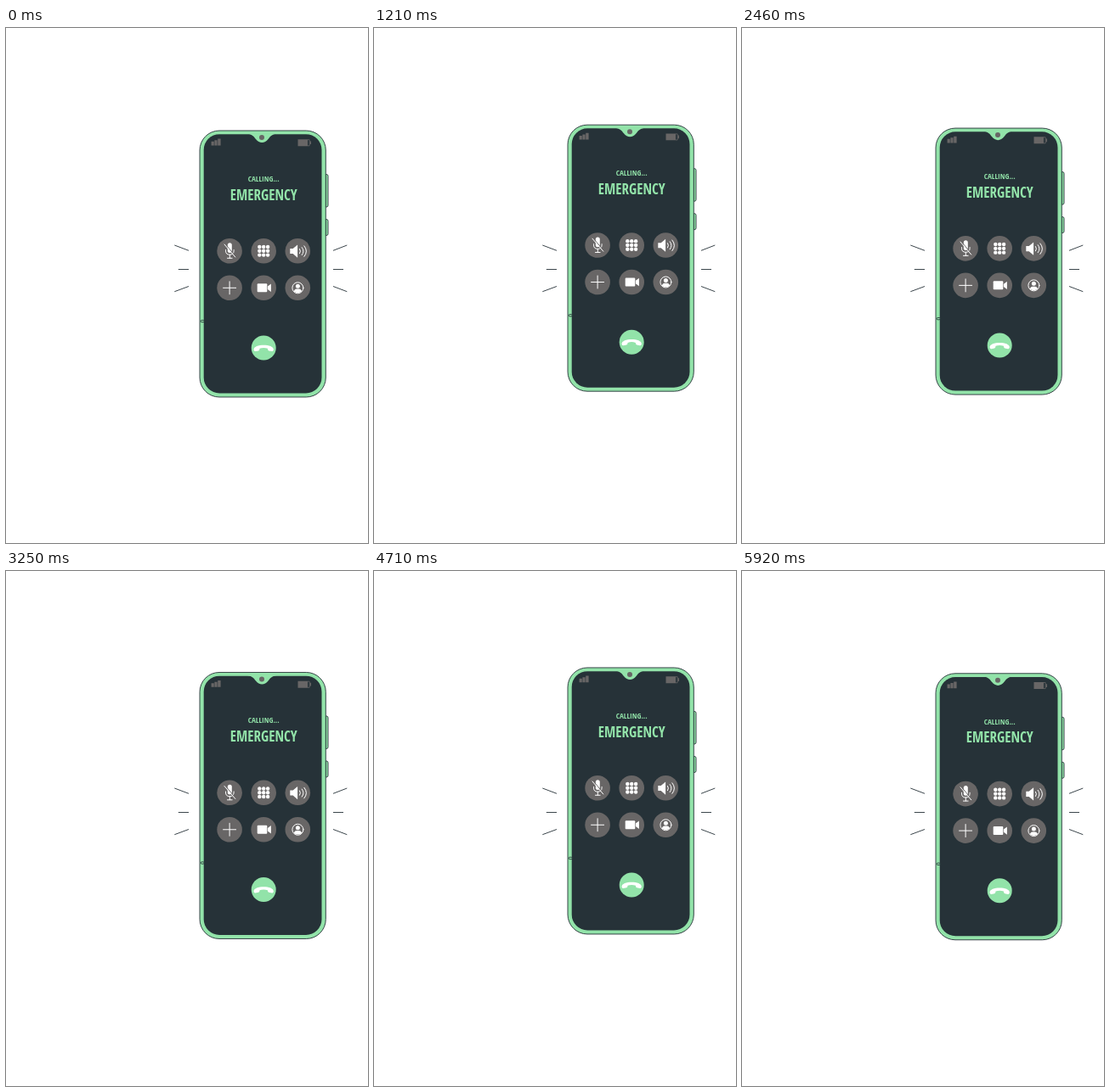
Write an HTML page that moves like this. It is 426 px wide and 607 px high and loops after 5960 ms.

```html
<!DOCTYPE html>
<html lang="en">
<head>
<meta charset="utf-8">
<title>Emergency call</title>
<style>
  html, body { margin: 0; width: 100%; height: 100%; overflow: hidden; background: #fff; }
  svg { display: block; width: 426px; height: 607px; }
  text {
    font-family: Oswald, "Open Sans Condensed", "Open Sans Condensed Light", "Noto Sans ExtraCondensed",
      "Liberation Sans Narrow", "Roboto Condensed", "Noto Sans", "Open Sans", sans-serif;
    font-weight: 300;
    font-stretch: 62.5%;
    text-anchor: middle;
    fill: #92e3a9;
  }
  .ink { stroke: #263238; stroke-width: .9; fill: none; }
  .shell { stroke: #263238; stroke-width: .9; fill: #92e3a9; }
  .grey { fill: #686666; }
  .white { fill: #fff; }
  .line { fill: none; stroke: #fff; stroke-width: 1; stroke-linecap: round; }
</style>
</head>
<body>
<svg viewBox="0 0 426 607">
  <path class="ink" d="M198.3 256 215 262.3M202.800 284.500H215M198.300 310.700 215 304.500
    M385 262.300 401.300 256M385 284.500H397M385 304.500 401.300 310.700"/>

  <g id="phone">
    <path class="shell" d="M376 172.500h1.200q1.800 0 1.800 2v34.500q0 2-1.800 2h-1.200z
      M376 225.500h1.200q1.800 0 1.800 2v15q0 2-1.800 2h-1.200z"/>
    <rect class="shell" x="228" y="121" width="148.300" height="314" rx="23"/>
    <rect x="232.700" y="125.200" width="138.800" height="305.300" rx="18.500" fill="#263238"/>
    <path fill="#92e3a9" d="M284 124.500C290 125.400 291.500 128 294 131C298 136.500 304.500 136.500 308.500 131
      C311 128 312.500 125.400 318.500 124.500z"/>
    <circle class="grey" cx="301" cy="129" r="3"/>
    <rect class="shell" x="229.200" y="344.400" width="4" height="2.300" rx="1.100"/>

    <path class="grey" d="M241.600 133.800h3.200v4.600h-3.200zM245.400 132.300h3.200v6.100h-3.200zM249.200 130.600h3.400v7.800h-3.400z
      M343.500 131.300h11.500v7.900h-11.500zM357.700 133.400h1.300v3.700h-1.300z"/>
    <path d="M355 131.700h2.100v7.100h-2.100" fill="none" stroke="#686666" stroke-width=".8"/>

    <text x="303.300" y="181" font-size="11.200" data-max="37">CALLING...</text>
    <text x="303.300" y="202.600" font-size="20.300" data-max="79">EMERGENCY</text>

    <g id="pads" class="grey"></g>

    <!-- muted microphone -->
    <rect class="white" x="260.800" y="253.300" width="5" height="11.700" rx="2.500"/>
    <path class="line" d="M258.500 261.500v1q0 4.700 4.800 4.700t4.800-4.700v-1M263.300 267.200v4M260.500 271.300h5.600"/>
    <path d="M257.800 254.300 270.600 269.600" stroke="#686666" stroke-width="1"/>
    <path class="line" d="M257 255 269.800 270"/>

    <g id="keys" class="white"></g>

    <!-- speaker -->
    <path class="white" d="M334.300 260h3.400l5.400-4.500v15.200l-5.400-4.600h-3.400z"/>
    <path class="line" d="M345.500 260.400q2 2.700 0 5.400M348.200 258.600q3.600 4.500 0 9M350.900 256.800q5.200 6.300 0 12.600"/>

    <path class="line" d="M255.600 306.300h15M263.100 298.800v15"/>

    <!-- camera -->
    <rect class="white" x="295.700" y="301.300" width="11.600" height="10" rx="1"/>
    <path class="white" d="M307.900 304.600 311.900 301.600v9.400l-4-3z"/>

    <!-- contact -->
    <circle class="line" cx="343.400" cy="306.300" r="6.500"/>
    <circle class="white" cx="343.400" cy="304.300" r="2.500"/>
    <path class="white" d="M338.800 310.500q.7-2.900 3.200-2.900h2.800q2.500 0 3.200 2.900q-4.600 3.300-9.200 0z"/>

    <!-- hang up -->
    <circle cx="303.200" cy="377" r="14.500" fill="#92e3a9"/>
    <path class="white" d="M291.500 379.300C291 372 315.400 372 314.900 379.300
      Q314.800 381.300 313 381.100L309.300 380.400Q307.800 380 307.900 377.800
      Q303.200 376.100 298.500 377.800Q298.600 380 297.100 380.400L293.400 381.100Q291.600 381.300 291.500 379.300z"/>
  </g>
</svg>
<script>
  const LOOP = 5960, BOB = LOOP / 2, RISE = 8.4;
  const byId = id => document.getElementById(id);

  function dots(group, xs, ys, r) {
    for (const cy of ys) for (const cx of xs) {
      const dot = document.createElementNS("http://www.w3.org/2000/svg", "circle");
      for (const [key, value] of Object.entries({ cx, cy, r })) dot.setAttribute(key, value);
      group.append(dot);
    }
  }
  dots(byId("pads"), [263.1, 303.2, 343.3], [262.8, 306.3], 14.8);
  dots(byId("keys"), [298.3, 303.2, 308.1], [258, 262.8, 267.6], 2.2);

  // Choose a smaller type size when no narrow face is available.
  for (const label of document.querySelectorAll("text")) {
    const ratio = label.dataset.max / label.getComputedTextLength();
    if (ratio < 1) label.setAttribute("font-size", label.getAttribute("font-size") * ratio);
  }

  const phone = byId("phone");
  const start = performance.now();

  function draw(now) {
    const phase = Math.max(0, now - start) % BOB / BOB;
    const lift = RISE * (1 - Math.abs(1 - 2 * phase));
    phone.setAttribute("transform", `translate(0 ${-lift.toFixed(3)})`);
    requestAnimationFrame(draw);
  }
  draw(start);
</script>
</body>
</html>
```
